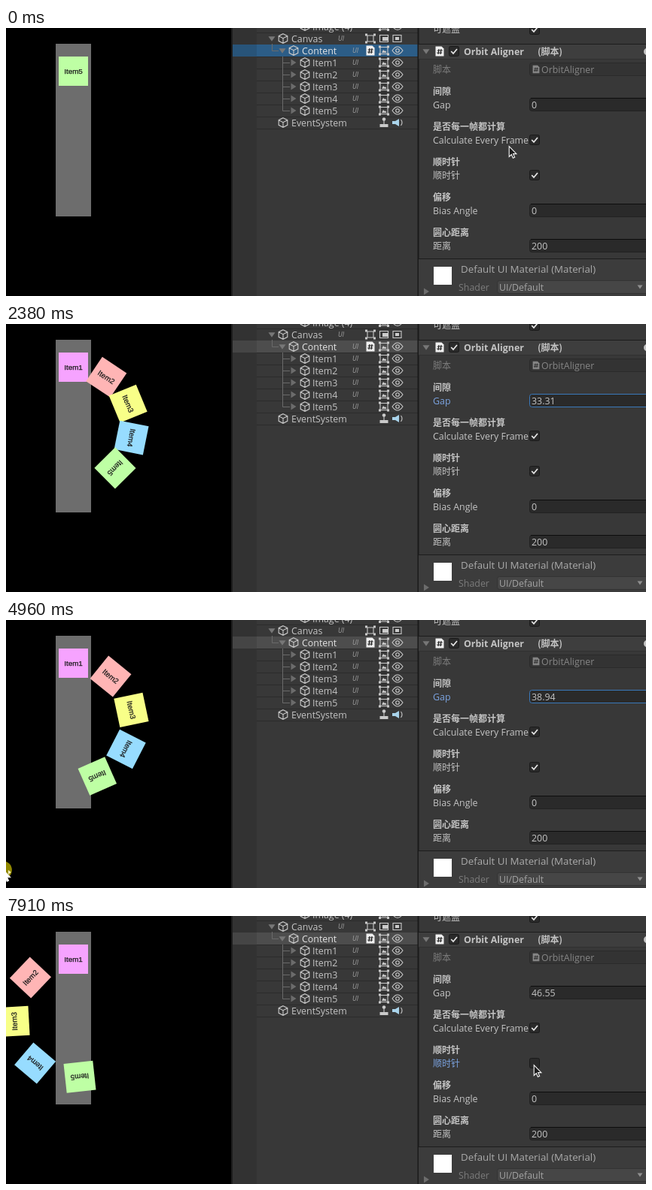
Write an HTML page that moves like this. It is 850x357 px and loops after 8000 ms.

```html
<!DOCTYPE html>
<html lang="zh">
<head>
<meta charset="utf-8">
<title>Circular layout inspector</title>
<style>
html, body { margin: 0; width: 100%; height: 100%; overflow: hidden; background: #000; }
svg { display: block; width: 100vw; height: 100vh; }
text { font: 12.4px 'Open Sans', 'Noto Sans CJK SC', sans-serif; fill: #c4c4c4; white-space: pre; }
.cjk { font: 12px 'Noto Sans CJK SC', 'Noto Sans CJK', sans-serif; }
.bold { font-weight: 700; }
.dim { fill: #7c7c7c; }
.tag { font: italic 8.5px 'Open Sans', sans-serif; fill: #a4a4a4; }
.tile { font: 9.8px 'Liberation Sans', sans-serif; fill: #1c1c1c; stroke: #1c1c1c; stroke-width: .25; text-anchor: middle; }
.line { fill: none; stroke: #cacaca; stroke-width: 1.1; }
.tree { fill: none; stroke: #6a6a6a; }
.focus { fill: #7ba3e0; }
</style>
</head>
<body>
<svg id="stage" viewBox="0 0 850 357"></svg>
<script>
const stage = document.getElementById('stage');

function add(tag, attrs, parent = stage, text) {
  const el = document.createElementNS('http://www.w3.org/2000/svg', tag);
  for (const key in attrs) el.setAttribute(key, attrs[key]);
  if (text !== undefined) el.textContent = text;
  parent.appendChild(el);
  return el;
}
const rect = (x, y, width, height, fill, more = {}) =>
  add('rect', { x, y, width, height, fill, ...more });
const label = (x, y, text, cls = '') => add('text', { x, y, class: cls }, stage, text);
const path = (d, more = { class: 'line' }) => add('path', { d, ...more });

// Icons, all placed by their centre
const down = (x, y, fill = '#777', r = 4.5) =>
  path(`M${x - r} ${y - r * .7}h${2 * r}l${-r} ${r * 1.4}z`, { fill });
const right = (x, y, fill = '#6c6c6c') => path(`M${x - 3.5} ${y - 4.5}v9l7 -4.5z`, { fill });
const cube = (x, y) => path(
  `M${x} ${y - 6.3}l5.8 3v6.6l-5.8 3l-5.8 -3v-6.6zM${x - 5.8} ${y - 3.3}l5.8 3l5.8 -3M${x} ${y - .3}v6.6`);

function eye(x, y) {
  path(`M${x - 7} ${y}Q${x} ${y - 10} ${x + 7} ${y}Q${x} ${y + 10} ${x - 7} ${y}z`);
  add('circle', { cx: x, cy: y, r: 2.3, class: 'line' });
}
function corners(x, y) {
  for (const dx of [-5.5, 5.5]) for (const dy of [-5, 5])
    rect(x + dx - 1.5, y + dy - 1.5, 3, 3, '#cacaca');
}
function picture(x, y) {
  path(`M${x - 5} ${y - 4.5}h10v9h-10z`);
  path(`M${x - 3} ${y + 3}l2 -4l2 2l1 -1l1.5 3z`, { fill: '#cacaca' });
  corners(x, y);
}
function script(x, y, size = 1, fill = '#f0f0f0', ink = '#222') {
  const g = add('g', { transform: `translate(${x} ${y}) scale(${size})` });
  add('path', { d: 'M-5.5 -6.5h8l3 3v10h-11z', fill }, g);
  add('path', {
    d: 'M-1 -3l-1 7M2 -3l-1 7M-3.3 -1h7M-3.8 2h7', fill: 'none', stroke: ink, 'stroke-width': 1.2
  }, g);
}
function checkbox(x, y) {
  rect(x - 6.5, y - 6.5, 13, 13, '#2a2a2a', { rx: 2, stroke: '#1a1a1a' });
  return path(`M${x - 3.8} ${y}l2.8 3l5 -6`, { fill: 'none', stroke: '#e8e8e8', 'stroke-width': 1.7 });
}
function field(y) {
  const box = rect(695.5, y - 9, 170, 17, '#2a2a2a', { rx: 3, stroke: '#212121' });
  const edge = path(`M697 ${y - 9}H850`, { stroke: '#0d0d0d' });
  return { box, edge };
}

// Game view
rect(66, 21, 47, 230, '#6d6d6d');
const tiles = ['#f6a3ff', '#ffb5b5', '#f8ff88', '#97dcff', '#beffa4'].map((fill, i) => {
  const g = add('g', {});
  add('rect', { x: -19.5, y: -19.5, width: 39, height: 39, fill }, g);
  add('text', { y: 3.5, class: 'tile' }, g, 'Item' + (i + 1));
  return g;
});

// Hierarchy
rect(299, 0, 551, 357, '#383838');
rect(299, 0, 2, 357, '#1c1c1c');
for (let y = 6; y < 140; y += 16) rect(333, y, 214, 1, '#2b2b2b');
const selection = rect(301, 22, 246, 16, '#2c5d87');
rect(301, 0, 32, 357, '#000', { opacity: .1 });

path('M353.5 21V30.5H362M367.5 38V110.5H377M367.5 46.5H377M367.5 62.5H377M367.5 78.5H377M367.5 94.5H377',
  { class: 'tree' });
cube(397, -3);
label(407, 2.5, 'Image (4)');
picture(502, -2.5);
eye(520, -2.5);

down(353, 14.5);
cube(368, 14);
label(379, 19, 'Canvas');
label(441, 17, 'UI', 'tag');
path('M480 10h8v8h-8z');
corners(484, 14);
path('M496.5 9.5h11v9h-11z');
rect(500, 12, 7, 5, '#cacaca');
path('M514 9.5h11v9h-11z');
rect(517, 12, 5, 4, '#cacaca');

down(367, 30.5);
cube(382, 30);
label(393, 35, 'Content').style.fill = '#e4e4e4';
script(484, 30);
for (let i = 0; i < 6; i++) {
  const y = 30 + i * 16;
  label(460, y + 3, 'UI', 'tag');
  picture(502, y);
  eye(520, y);
  if (!i) continue;
  right(382, y);
  cube(397, y);
  label(407, y + 5, 'Item' + i);
}
cube(368, 126);
label(379, 131, 'EventSystem');
rect(496.5, 128, 11, 4, '#cacaca');
path('M502 128v-5');
add('circle', { cx: 502, cy: 121.5, r: 2.3, fill: '#cacaca' });
path('M513 124h4l5 -3v10l-5 -3h-4z', { fill: '#a9d3ea' });
path('M524.5 122q3 4 0 8');

// Inspector
rect(546.5, 0, 2, 357, '#1a1a1a');
label(567, 5.5, '可遮盖', 'cjk');
checkbox(702, 2);
rect(548, 22, 302, 19, '#3e3e3e');
rect(548, 21, 302, 1, '#1c1c1c');
rect(548, 41, 302, 1, '#303030');
down(558, 31.5);
script(576, 31);
checkbox(595, 31);
label(608, 36, 'Orbit Aligner', 'bold');
label(706, 36, '(脚本)', 'cjk bold');
add('circle', { cx: 852, cy: 31.5, r: 5, fill: '#c4c4c4' });

label(567, 59.5, '脚本', 'cjk dim');
rect(695.5, 46.5, 170, 17, '#333', { rx: 3, stroke: '#2a2a2a' });
script(704, 55, .8, '#858585', '#333');
label(711, 59.5, 'OrbitAligner').style.fill = '#868686';

[['间隙', 88.5], ['是否每一帧都计算', 135.5], ['顺时针', 182.5], ['偏移', 229.5], ['圆心距离', 276.5]]
  .forEach(([text, y]) => label(567, y, text, 'cjk bold'));
const gapLabel = label(567, 106.5, 'Gap');
const gapField = field(102.5);
const gapText = label(698, 107, '0');
label(567, 153.5, 'Calculate Every Frame');
checkbox(702, 149);
const turnLabel = label(567, 200.5, '顺时针', 'cjk');
const turnCheck = checkbox(702, 196);
label(567, 247.5, 'Bias Angle');
field(243.5);
label(698, 248, '0');
label(567, 294.5, '距离', 'cjk');
field(290.5);
label(698, 295, '200');

rect(548, 307, 302, 1, '#1c1c1c');
rect(548, 308, 302, 49, '#3c3c3c');
rect(568, 318, 24, 24, '#fff');
label(604, 326, 'Default UI Material (Material)').style.cssText = 'font-size:13.3px;fill:#ababab';
label(601, 349.5, 'Shader', 'dim');
rect(652.5, 336.5, 210, 17, '#464646', { rx: 3, stroke: '#333' });
label(655, 349.5, 'UI/Default').style.fill = '#a4a4a4';
down(842, 345, '#909090', 3.5);
right(558.5, 351);

// Pointer
const pointer = add('g', {});
const halo = add('circle', { cx: 0, cy: 1, r: 12, fill: '#fff000', opacity: .57 }, pointer);
const slide = add('path', { d: 'M-8 4l4 -3v6zM11 4l-4 -3v6z', fill: '#f4f0c0' }, pointer);
const arrow = add('path', {
  d: 'M.2 .5V14.4L3.3 11.5L5.4 16.3L7.7 15.3L5.6 10.6H9.9Z', stroke: '#f4f4f4', 'stroke-width': 1.1
}, pointer);

// Timing in ms
const LOOP = 8000, PRESS = 900, RELEASE = 5930, CLICK = 7710, TOGGLE = 7910;
const gapKeys = [[970, 0], [1300, 10], [1680, 23.5], [2000, 29.5], [2380, 33.31], [2520, 40],
  [2950, 46], [3350, 43], [3490, 40.9], [3560, 37], [3770, 30.2], [3910, 31.27], [4190, 29.8],
  [4960, 38.94], [5030, 39.6], [5450, 44.8], [5730, 46.55]];
const dragY = [[900, 97], [1680, 130], [2520, 247], [2950, 240], [3350, 248], [3490, 280],
  [4190, 320], [4960, 332], [5100, 332], [5730, 312]];
const moveX = [[0, 668], [70, 667], [450, 628], [830, 592], [5930, 241], [6000, 267], [6200, 267],
  [6550, 590], [6680, 622], [6890, 621], [7020, 622], [7400, 680], [7700, 701]];
const moveY = [[0, 157], [70, 156], [450, 128], [830, 97], [5930, 312], [6000, 321], [6200, 321],
  [6550, 165], [6680, 175], [6890, 182], [7020, 184], [7400, 211], [7700, 198]];

function at(keys, t) {
  if (t <= keys[0][0]) return keys[0][1];
  for (let i = 1; i < keys.length; i++) {
    const [t0, a] = keys[i - 1], [t1, b] = keys[i];
    if (t < t1) return a + (b - a) * (t - t0) / (t1 - t0);
  }
  return keys[keys.length - 1][1];
}

// Dragging scrubs the value; the pointer wraps round a desktop wider than the stage
function dragX(gap) {
  const x = 592 + gap * 32.2;
  return x > 1830 ? x - 1850 : x;
}

function draw(t) {
  const gap = +at(gapKeys, t).toFixed(2);
  // The tiles run slightly ahead of the number field
  const turn = at(gapKeys, t + 10) * (t < TOGGLE ? 1 : -1);
  tiles.forEach((tile, i) => {
    const deg = turn * i, rad = deg * Math.PI / 180;
    const x = 89.5 + 78.6 * Math.sin(rad), y = 136.1 - 78.6 * Math.cos(rad);
    tile.setAttribute('transform', `translate(${x} ${y}) rotate(${deg})`);
  });
  gapText.textContent = gap;

  const editing = t >= PRESS && t < CLICK;
  const dragging = t >= PRESS && t < RELEASE;
  const sliding = t >= 800 && t < RELEASE;
  selection.setAttribute('fill', t < PRESS ? '#2c5d87' : '#4d4d4d');
  gapField.box.setAttribute('stroke', editing ? '#3a79bb' : '#212121');
  gapField.edge.style.display = editing ? 'none' : '';
  gapLabel.classList.toggle('focus', editing);
  turnLabel.classList.toggle('focus', t >= CLICK);
  turnCheck.style.display = t < TOGGLE ? '' : 'none';

  const x = dragging ? dragX(gap) : at(moveX, t);
  const y = dragging ? at(dragY, t) : at(moveY, t);
  pointer.setAttribute('transform', `translate(${x} ${y})`);
  halo.style.display = dragging || (t >= CLICK && t < TOGGLE) ? '' : 'none';
  slide.style.display = sliding ? '' : 'none';
  arrow.setAttribute('fill', sliding ? '#fff' : '#1c1c1c');
}

// The clock runs in ticks of 10 ms
const start = performance.now();
function tick() {
  draw(Math.floor((performance.now() - start) % LOOP / 10) * 10);
  requestAnimationFrame(tick);
}
tick();
</script>
</body>
</html>
```
